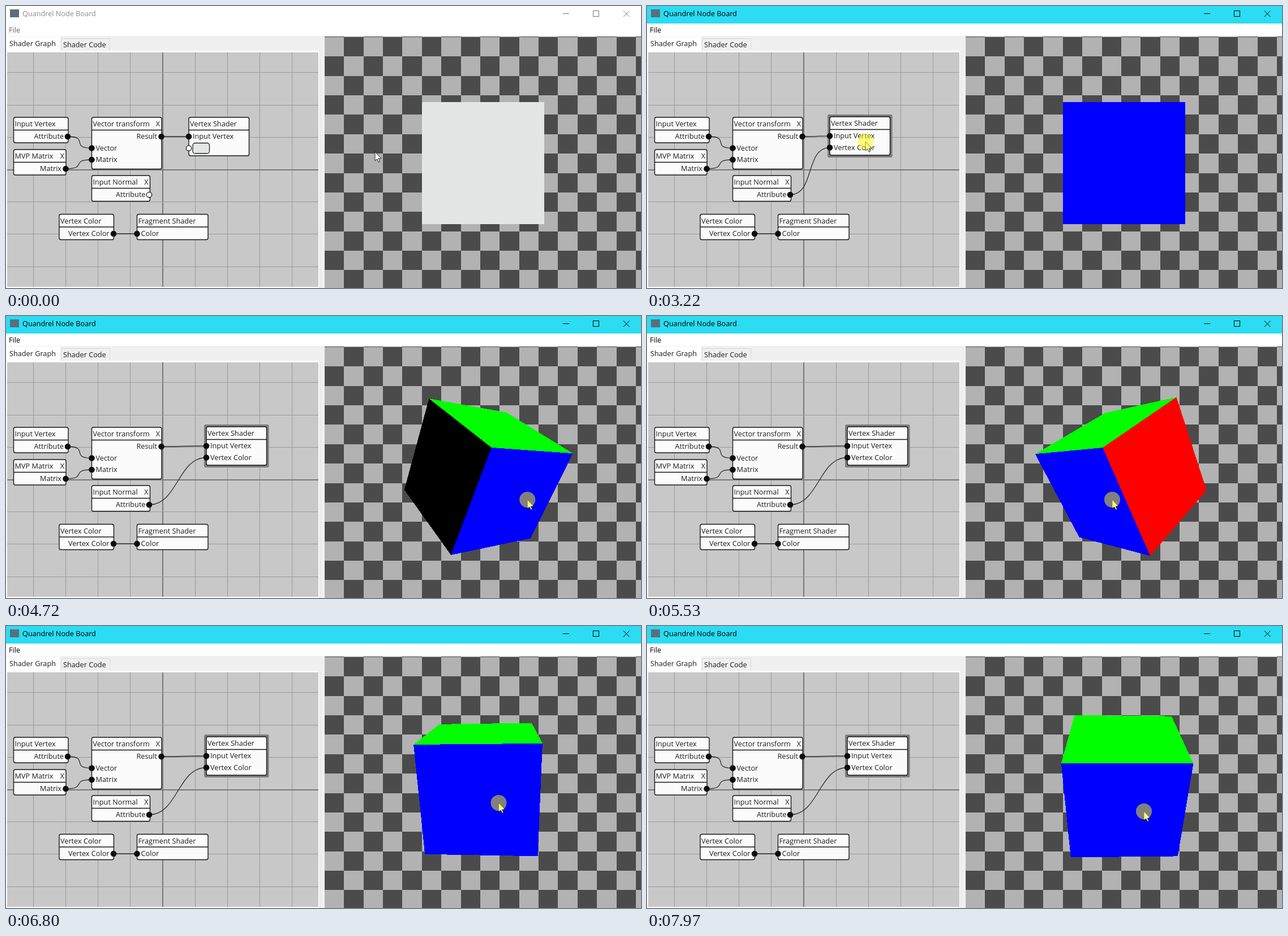
Recreate the animation shown at these times as an HTML page. Size 1122 by 499 pixels, loop 8 s.

```html
<!DOCTYPE html>
<html lang="en">
<head>
<meta charset="utf-8">
<title>Quandrel Node Board</title>
<style>
html, body { margin: 0; width: 100%; height: 100%; overflow: hidden; background: #f0f0f0; }
svg { display: block; width: 1122px; height: 499px; }
text { font: 12.7px "Open Sans", "Noto Sans", sans-serif; fill: #1c1c1c; white-space: pre; }
.end { text-anchor: end; }
.crisp { shape-rendering: crispEdges; }
.box { fill: #fbfbfb; stroke: #161616; stroke-width: 1.4; }
.glow { fill: #7c7c7c; display: none; }
.on > .glow { display: block; }
.port { fill: #0c0c0c; stroke: #0c0c0c; stroke-width: 1.2; }
.port.open { fill: #fff; }
.link { fill: none; stroke: #2a2a2e; stroke-width: 1.3; }
.chrome { fill: none; stroke: #777; }
#bar { fill: #fff; }
#name { fill: #8c8c8c; }
#menu { fill: #666; }
.active #bar { fill: #2bdcf2; }
.active #name, .active #menu { fill: #000; }
.active .chrome { stroke: #000; }
</style>
</head>
<body>
<svg id="stage" viewBox="0 0 1122 499">
  <rect width="1122" height="499" fill="#f0f0f0"/>
  <rect y="31" width="1122" height="22" fill="#fff"/>
  <rect id="bar" width="1122" height="31"/>
  <rect x="7" y="6" width="16" height="14" fill="#5a6f7c"/>
  <text id="name" x="29" y="18">Quandrel Node Board</text>
  <path class="chrome crisp" d="M984 13.5h11M1037.5 8.5h10v10h-10z"/>
  <path class="chrome" d="M1091 8.5l10.5 10.5m0-10.5l-10.5 10.5"/>
  <text id="menu" x="5" y="47">File</text>

  <g class="crisp">
    <rect x="97" y="57" width="86" height="23" fill="#f0f0f0" stroke="#d9d9d9"/>
    <rect y="79" width="555" height="420" fill="#fff"/>
    <rect x="554" y="79" width="1" height="420" fill="#dcdcdc"/>
    <rect y="54" width="96" height="26" fill="#fff"/>
    <rect x="2" y="82" width="550" height="415" fill="#c8c8c8"/>
    <g id="grid"></g>
    <g id="checker"></g>
  </g>
  <text x="6" y="71">Shader Graph</text>
  <text x="101" y="73">Shader Code</text>

  <g id="cube" class="crisp"></g>
  <g id="nodes"></g>
  <g id="links"></g>
  <g id="ports"></g>
  <path id="arrow" d="M0 0V16L3.7 12.6 6.2 18.2 8.6 17.2 6.1 11.8H11z" fill="#fff" stroke="#111" stroke-width=".9"/>
  <circle id="press" r="14" fill="#ff0" fill-opacity=".5"/>
</svg>
<script>
const $ = id => document.getElementById(id);
const LOOP = 8000;
const LINK_GRAB = 1410, LINK_DROP = 2580, NODE_GRAB = 3060, NODE_DROP = 3600, ORBIT = 4080;

// Repaint bursts: first time, last time, number of repaints
const bursts = [
  [80, 560, 7], [710, 870, 3], [1260, 1260, 1], [1410, 2120, 10], [2270, 2430, 3],
  [2580, 3370, 11], [3450, 4240, 11], [4320, 5050, 10], [5130, 5530, 6],
  [5690, 6090, 6], [6240, 7040, 11], [7120, 7420, 5], [7570, 7970, 6]
];

// Pointer paths: time, x, y
const editPath = [
  [0, 652, 258], [80, 630, 262], [240, 450, 325], [320, 350, 352], [400, 290, 356],
  [560, 248, 334], [870, 255, 330], [1410, 254, 334], [1570, 254, 334], [1880, 296, 280],
  [2120, 316, 250], [2580, 318, 251], [2980, 386, 241], [3060, 386, 241], [3220, 386, 240],
  [3370, 402, 240], [3530, 417, 240], [3600, 417, 240], [3850, 740, 402], [4080, 875, 290]
];
const orbitPath = [
  [4080, 875, 290], [4240, 887, 324], [4400, 910, 326], [4560, 930, 326], [4720, 922, 325],
  [5290, 845, 327], [5530, 822, 325], [5690, 824, 318], [6090, 834, 248], [6320, 822, 271],
  [6560, 838, 300], [7040, 903, 326], [7280, 918, 333], [7420, 928, 332], [7490, 928, 332],
  [7970, 878, 328]
];

function stepTime(t) {
  let shown = 0;
  for (const [from, to, n] of bursts) {
    if (t < from) break;
    const gap = n > 1 ? (to - from) / (n - 1) : 0;
    const i = gap ? Math.min(n - 1, Math.floor((t - from) / gap + 0.15)) : 0;
    shown = from + i * gap;
  }
  return shown;
}

function pointer(t) {
  const path = t < ORBIT ? editPath : orbitPath;
  const i = path.findIndex(p => p[0] > t);
  if (i < 0) return path[path.length - 1].slice(1);
  const [t0, x0, y0] = path[i - 1], [t1, x1, y1] = path[i];
  const k = (t - t0) / (t1 - t0);
  return [x0 + (x1 - x0) * k, y0 + (y1 - y0) * k];
}

const rect = (x, y, w, h, attrs) => `<rect x="${x}" y="${y}" width="${w}" height="${h}" ${attrs}/>`;
const label = (x, y, s, cls = "") => `<text x="${x}" y="${y}" class="${cls}">${s}</text>`;
const port = (x, y, id) =>
  `<circle ${id ? `id="${id}"` : ""} class="port" cx="${x}" cy="${y}" r="4.7"/>`;
const curve = (x0, y0, x1, y1) => {
  const o = 30 + 0.2 * Math.abs(x1 - x0);
  return `M${x0} ${y0}C${x0 + o} ${y0} ${x1 - o} ${y1} ${x1} ${y1}`;
};

function node(id, x, y, w, h, title, rows, closable) {
  return `<g id="${id}">` +
    rect(x - 4, y - 4, w + 8, h + 8, 'rx="3" class="glow"') +
    rect(x, y, w, h, 'rx="3" class="box"') +
    `<path class="box" d="M${x} ${y + 22.5}h${w}"/>` +
    label(x + 2, y + 16, title) +
    (closable ? label(x + w - 3, y + 16, "X", "end") : "") +
    rows.map(([side, row, s]) => {
      const ty = y + 38 + row * 20.6;
      return side === "out" ? label(x + w - 8, ty, s, "end") : label(x + 7, ty, s);
    }).join("") + "</g>";
}

function buildGrid() {
  const tone = bold => `fill="${bold ? "#787878" : "#999"}"`;
  let out = "";
  for (let i = 0; i < 9; i++) {
    const bold = i === 4;
    out += rect(Math.round(47.6 + 57.2 * i), 82, bold ? 2 : 1, 415, tone(bold));
  }
  for (let j = 0; j < 7; j++) {
    const bold = j === 3;
    out += rect(2, Math.round(117.4 + 57.2 * j), 550, bold ? 2 : 1, tone(bold));
  }
  $("grid").innerHTML = out;
}

function buildChecker() {
  const colX = c => Math.min(1122, Math.round(563 + c * 34.37));
  const rowY = r => Math.max(54, Math.min(499, Math.round(55 + r * 34.37)));
  let out = rect(563, 54, 559, 445, 'fill="#b2b2b2"');
  for (let r = -1; r < 13; r++) {
    for (let c = 0; c < 17; c++) {
      if ((r + c) % 2 === 0) continue;
      out += rect(colX(c), rowY(r), colX(c + 1) - colX(c), rowY(r + 1) - rowY(r), 'fill="#4b4b4b"');
    }
  }
  $("checker").innerHTML = out;
}

function buildNodes() {
  $("nodes").innerHTML =
    node("vertexIn", 13.5, 197, 96.5, 45, "Input Vertex", [["out", 0, "Attribute"]]) +
    node("mvp", 13.5, 254, 92.5, 45, "MVP Matrix", [["out", 0, "Matrix"]], true) +
    node("transform", 151.5, 197, 123.5, 91.5, "Vector transform",
      [["out", 0, "Result"], ["in", 1, "Vector"], ["in", 2, "Matrix"]], true) +
    node("normal", 151.5, 300, 103, 45.5, "Input Normal", [["out", 0, "Attribute"]], true) +
    node("color", 94, 368.5, 96.5, 45, "Vertex Color", [["out", 0, "Vertex Color"]]) +
    node("fragment", 231.5, 368.5, 125.5, 45, "Fragment Shader", [["in", 0, "Color"]]) +
    node("shader", 323, 197, 106.5, 68, "Vertex Shader", [["in", 0, "Input Vertex"]]);
  $("shader").innerHTML +=
    `<g id="swatch">${rect(330, 242.5, 29.5, 18.5, 'rx="4" fill="#e4e6e5" stroke="#222" stroke-width="1.3"')}</g>` +
    `<g id="colorLabel">${label(330, 255.5, "Vertex Color")}</g>`;

  const fixed = [[109, 231, 151.5, 251.5], [105.5, 288, 151.5, 272], [190, 403, 231.5, 403]];
  $("links").innerHTML = fixed.map(l => `<path class="link" d="${curve(...l)}"/>`).join("") +
    '<path id="resultLink" class="link"/><path id="normalLink" class="link"/>';
  $("ports").innerHTML = fixed.map(([a, b, c, d]) => port(a, b) + port(c, d)).join("") +
    port(274.5, 231) + port(253, 334, "normalPort") +
    `<g id="shaderPorts">${port(323, 231) + port(323, 251.5, "colorPort")}</g>`;
}

// Faces: axis, sign, colour
const faces = [
  [0, 1, "#f00"], [0, -1, "#000"], [1, 1, "#0f0"], [1, -1, "#000"], [2, 1, "#00f"], [2, -1, "#000"]
];
const corners = [[-1, -1], [1, -1], [1, 1], [-1, 1]];

function drawCube(yaw, pitch, lit) {
  const ca = Math.cos(yaw), sa = Math.sin(yaw), cp = Math.cos(pitch), sp = Math.sin(pitch);
  const project = ([x, y, z]) => {
    const v = y * cp - z * sp, w = y * sp + z * cp;
    const k = 540 / (6 - (w * ca - x * sa));
    return [842.8 + (x * ca + w * sa) * k, 277.5 - v * k];
  };
  $("cube").innerHTML = faces.map(([axis, sign, fill]) => {
    const q = corners.map(([a, b]) => {
      const p = [];
      p[axis] = sign;
      p[(axis + 1) % 3] = a * sign;
      p[(axis + 2) % 3] = b;
      return project(p);
    });
    const area = (q[1][0] - q[0][0]) * (q[2][1] - q[0][1]) - (q[2][0] - q[0][0]) * (q[1][1] - q[0][1]);
    if (area >= 0) return "";
    return `<polygon points="${q.join(" ")}" fill="${lit ? fill : "#e4e6e5"}"/>`;
  }).join("");
}

const show = (id, on) => { $(id).style.display = on ? "" : "none"; };

function render(t) {
  const [x, y] = pointer(t);
  const linking = t >= LINK_GRAB && t < LINK_DROP, linked = t >= LINK_DROP;
  const moving = t >= NODE_GRAB, orbit = t >= ORBIT;

  $("stage").classList.toggle("active", t >= LINK_GRAB);
  $("normal").classList.toggle("on", t >= LINK_GRAB && !moving);
  $("shader").classList.toggle("on", moving);

  let dx = 0, dy = 0;
  if (moving) {
    const [nx, ny] = pointer(Math.min(t, NODE_DROP));
    dx = nx - 386;
    dy = ny - 241;
  }
  for (const id of ["shader", "shaderPorts"]) $(id).setAttribute("transform", `translate(${dx} ${dy})`);

  const end = linked ? [323 + dx, 251.5 + dy] : [x, y];
  $("resultLink").setAttribute("d", curve(274.5, 231, 323 + dx, 231 + dy));
  $("normalLink").setAttribute("d", curve(253, 334, ...end));
  show("normalLink", linked || (linking && t > 1600));
  show("swatch", !linked);
  show("colorLabel", linked);
  for (const id of ["normalPort", "colorPort"]) $(id).classList.toggle("open", !linked);

  const turn = 0.873 * Math.PI / 180;
  drawCube(orbit ? (x - 875.2) * turn : 0, orbit ? (y - 290.2) * turn : 0, linked);

  for (const id of ["arrow", "press"]) $(id).setAttribute("transform", `translate(${x} ${y})`);
  show("press", linking || (moving && t < NODE_DROP) || orbit);
}

buildGrid();
buildChecker();
buildNodes();
const start = performance.now();
(function tick() {
  render(stepTime((performance.now() - start) % LOOP));
  requestAnimationFrame(tick);
})();
</script>
</body>
</html>
```
